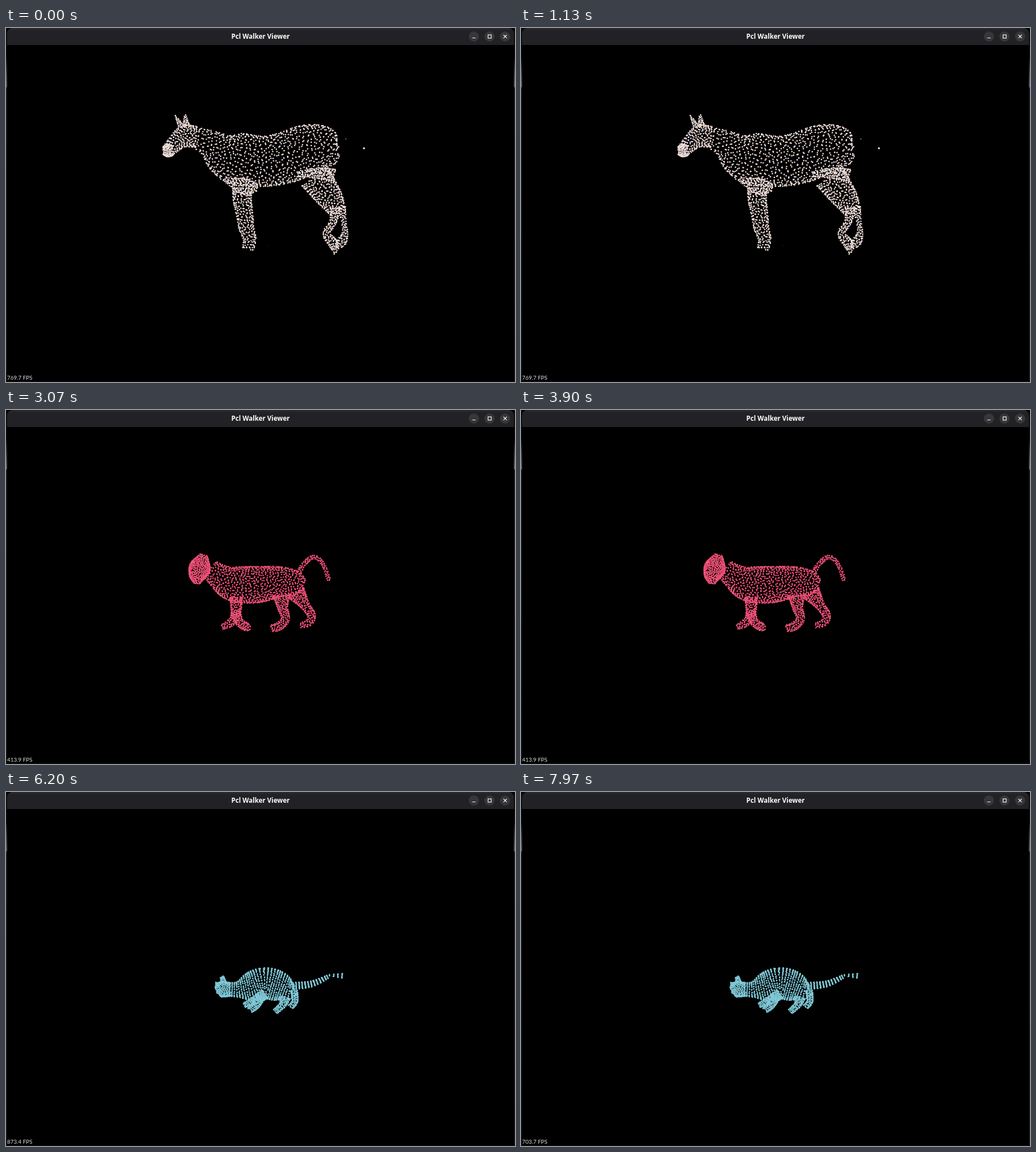
These frames come from a looping animation (898x624 px, 8 s). An HTML page with a canvas:

```html
<!DOCTYPE html>
<html lang="en">
<head>
<meta charset="utf-8">
<title>Pcl Walker Viewer</title>
<style>
html, body { margin: 0; width: 100%; height: 100%; overflow: hidden; background: #000; }
#stage { position: relative; width: 898px; height: 624px; overflow: hidden; background: #000; }
canvas { position: absolute; left: 0; top: 0; }
.edge { position: absolute; top: 0; width: 2px; height: 624px;
  background: linear-gradient(#0c0c0c 52px, #333436 72px, #606164 103px, #1b1c1c 106px, #141414); }
.edge.right { right: 0; }
#foot { position: absolute; left: 0; right: 0; bottom: 0; height: 2px; background: #0b0b0b; }
#bar { position: absolute; left: 2px; top: 0; width: 894px; height: 30px;
  border-radius: 9px 9px 0 0; background: linear-gradient(#2b2b2f, #222226 5px); }
#bar span { position: absolute; left: 0; right: 0; top: 0; text-align: center;
  color: #fff; font: bold 11.6px/30px "Open Sans", "Noto Sans", sans-serif; }
#bar svg { position: absolute; left: -2px; top: 0; }
#fps { position: absolute; left: 2px; top: 610px; color: #dedede; white-space: pre;
  font: 9.9px/13px Lato, "Liberation Sans", sans-serif; }
</style>
</head>
<body>
<div id="stage">
  <canvas id="view" width="898" height="624"></canvas>
  <div class="edge"></div><div class="edge right"></div><div id="foot"></div>
  <div id="bar">
    <span>Pcl Walker Viewer</span>
    <svg width="898" height="30" fill="none" stroke="#f2f2f2" stroke-width="1.2">
      <g fill="#37373a" stroke="none">
        <circle cx="825.5" cy="15" r="9"/><circle cx="853" cy="15" r="9"/><circle cx="880.5" cy="15" r="9"/>
      </g>
      <path d="M822.5 17.5h6M850.5 12.2h5.6v5.6h-5.6zM877.7 12l5.8 5.8M883.5 12l-5.8 5.8"/>
    </svg>
  </div>
  <div id="fps"></div>
</div>
<script>
const W = 898, H = 624, LOOP = 8000;
const ctx = document.getElementById('view').getContext('2d');
const label = document.getElementById('fps');

function seeded(a) {
  return () => {
    a = (a + 0x6D2B79F5) | 0;
    let t = Math.imul(a ^ (a >>> 15), 1 | a);
    t = (t + Math.imul(t ^ (t >>> 7), 61 | t)) ^ t;
    return ((t ^ (t >>> 14)) >>> 0) / 4294967296;
  };
}

// Catmull-Rom curve through "x,y,radius" key points
function spine(keys) {
  const p = keys.split(' ').map(k => k.split(',').map(Number)), out = [];
  const at = i => p[Math.max(0, Math.min(p.length - 1, i))];
  for (let i = 0; i < p.length - 1; i++) {
    const [a, b, c, d] = [-1, 0, 1, 2].map(k => at(i + k));
    for (let t = 0; t < 1; t += 0.05) {
      out.push([0, 1, 2].map(k => 0.5 * (2 * b[k] + (c[k] - a[k]) * t +
        (2 * a[k] - 5 * b[k] + 4 * c[k] - d[k]) * t * t +
        (3 * b[k] - a[k] - 3 * c[k] + d[k]) * t * t * t)));
    }
  }
  return out.concat([at(p.length)]);
}

// Spread dots evenly over the skin of a round tube, seen from the side.
// ring > 0 gathers them into hoops that far apart.
function tube(rnd, gap, keys, ring = 0) {
  const line = spine(keys), dist = [0], dots = [];
  for (let i = 1; i < line.length; i++)
    dist.push(dist[i - 1] + Math.hypot(line[i][0] - line[i - 1][0], line[i][1] - line[i - 1][1]));
  const length = dist[dist.length - 1], wide = Math.max(...line.map(p => p[2]));
  const tries = 2 * Math.PI * wide * length / (gap * gap) * 8;
  for (let n = 0; n < tries; n++) {
    let s = rnd() * length;
    if (ring) s = Math.min(length, Math.round(s / ring) * ring + rnd());
    const i = Math.max(1, dist.findIndex(d => d >= s));
    const [a, b] = [line[i - 1], line[i]], step = dist[i] - dist[i - 1] || 1;
    const [cx, cy, r] = a.map((v, k) => v + (b[k] - v) * (s - dist[i - 1]) / step);
    if (rnd() * wide > r) continue;
    const turn = rnd() * 2 * Math.PI, off = r * Math.cos(turn), z = r * Math.sin(turn);
    const x = cx - off * (b[1] - a[1]) / step, y = cy + off * (b[0] - a[0]) / step;
    if (dots.every(q => (q[0] - x) ** 2 + (q[1] - y) ** 2 + (q[2] - z) ** 2 > gap * gap))
      dots.push([x, y, z]);
  }
  return dots;
}

function cloud(seed, colors, tubes, strays = []) {
  const rnd = seeded(seed), layer = document.createElement('canvas');
  layer.width = W;
  layer.height = H;
  const g = layer.getContext('2d');
  const dot = (x, y, r, color) => {
    g.fillStyle = color;
    g.beginPath();
    g.arc(x, y, r, 0, 7);
    g.fill();
  };
  for (const [gap, keys, ring] of tubes)
    for (const [x, y] of tube(rnd, gap, keys, ring))
      dot(x, y, 1.3, colors[Math.floor(rnd() * colors.length)]);
  strays.forEach(s => dot(...s));
  return layer;
}

const speck = [461.5, 384, 0.8, '#282828'];

const horse = cloud(7, ['#f4e0dc', '#f0d8d4', '#f4e4dc', '#dcdcf0', '#ece0c8', '#ecccd0'], [
  [4.2, '278,217,6 286,216,11 299,203,14 316,191,19 336,192,18'],
  [2.8, '277,216,7 285,216,11 294,216,9'],
  [3, '299,154,1 308,172,4'],
  [3, '316,153,1 318,172,6'],
  [6.3, '335,193,18 360,204,24 385,222,38 410,231,46 455,235,44 495,228,45 530,215,44 560,213,40 580,217,25 587,217,8'],
  [4.2, '388,268,4 420,279,14 444,281,6'],
  [4.4, '417,282,17 417,303,16 422,335,14 424,352,13 430,372,11 427,390,10'],
  [4.6, '545,262,28 572,300,22 585,324,14'],
  [4, '514,258,4 550,256,9 580,260,11'],
  [3.6, '581,316,9 577,342,6 565,362,6 577,380,8 581,398,2'],
  [3.6, '592,316,7 596,342,4 598,362,5 592,377,8 583,388,3']
], [speck, [631.5, 212, 1.7, '#f0eeee'], [599.5, 195.5, 1, '#a89a78']]);

const lion = cloud(21, ['#f4507c', '#f04c78', '#f85880', '#e84874', '#f05c70'], [
  [2.7, '337,306,5 338,292,15 343,275,18 349,255,6'],
  [4.5, '360,280,17 376,293,22 400,306,30 440,308,32 480,303,27 512,305,21 526,308,9'],
  [3.4, '406,330,11 406,352,9 402,369,7 390,379,6 381,382,4'],
  [3.2, '405,355,8 412,374,7 424,382,7 431,383,4'],
  [3.4, '486,326,15 488,348,9 493,368,7 482,381,7 468,385,6'],
  [3.4, '512,322,16 528,345,8 539,362,7 534,375,6 519,380,4'],
  [3.4, '517,286,4 527,270,3.5 544,259,3.5 560,273,3 570,301,3']
]);

const runner = cloud(33, ['#e87cb0', '#e480b0', '#ec88b4', '#dc78b4', '#e87ca4'], [
  [2.3, '349,257,8 352,245,12.5 352,234,5'],
  [2.4, '346,266,5 362,262,10 385,266,18 400,281,16'],
  [2.8, '396,278,16 412,293,16 430,304,16'],
  [2.8, '430,305,13 402,312,11 380,321,12 366,323,5'],
  [2.8, '370,323,6 380,332,9 394,341,7 406,350,6'],
  [2.4, '404,348,6 416,357,6 412,373,4'],
  [2.9, '430,302,13 455,317,11 485,333,8 504,347,7 516,362,7 505,377,4']
], [speck]);

const cat = cloud(52, ['#7cc8d8', '#84ccdc', '#78c4dc', '#88ccd4', '#7cc4cc'], [
  [2.6, '371,350,5 378,348,13 396,348,12'],
  [2.2, '381,325,3 384,337,5'],
  [2.2, '369,336,1 377,341,3'],
  [3.4, '394,348,12 410,348,14 430,344,25 456,337,27 480,342,26 500,349,17 512,349,8', 4.2],
  [2.6, '457,356,9 440,367,7 420,376,4'],
  [2.6, '450,362,7 440,376,7 430,385,5'],
  [2.6, '492,362,10 488,375,6 475,387,5'],
  [2.6, '508,350,6 510,368,5 502,379,5'],
  [1.8, '506,342,6 540,338,5 567,326,3', 5.4],
  [1.8, '570,323,1 593,324,4', 7.5]
]);

const STEPS = [
  [0, horse, '769.7'], [1500, horse, '515.2'], [2970, lion, '413.9'],
  [4640, runner, '722.5'], [5470, cat, '873.4'], [6630, cat, '703.7']
];
let shown = null;
const start = performance.now();

function draw() {
  const t = (performance.now() - start) % LOOP;
  const step = STEPS.filter(s => s[0] <= t).pop();
  if (step !== shown) {
    shown = step;
    ctx.clearRect(0, 0, W, H);
    ctx.drawImage(step[1], 0, 0);
    label.textContent = step[2] + ' FPS';
  }
  requestAnimationFrame(draw);
}
draw();
</script>
</body>
</html>
```
